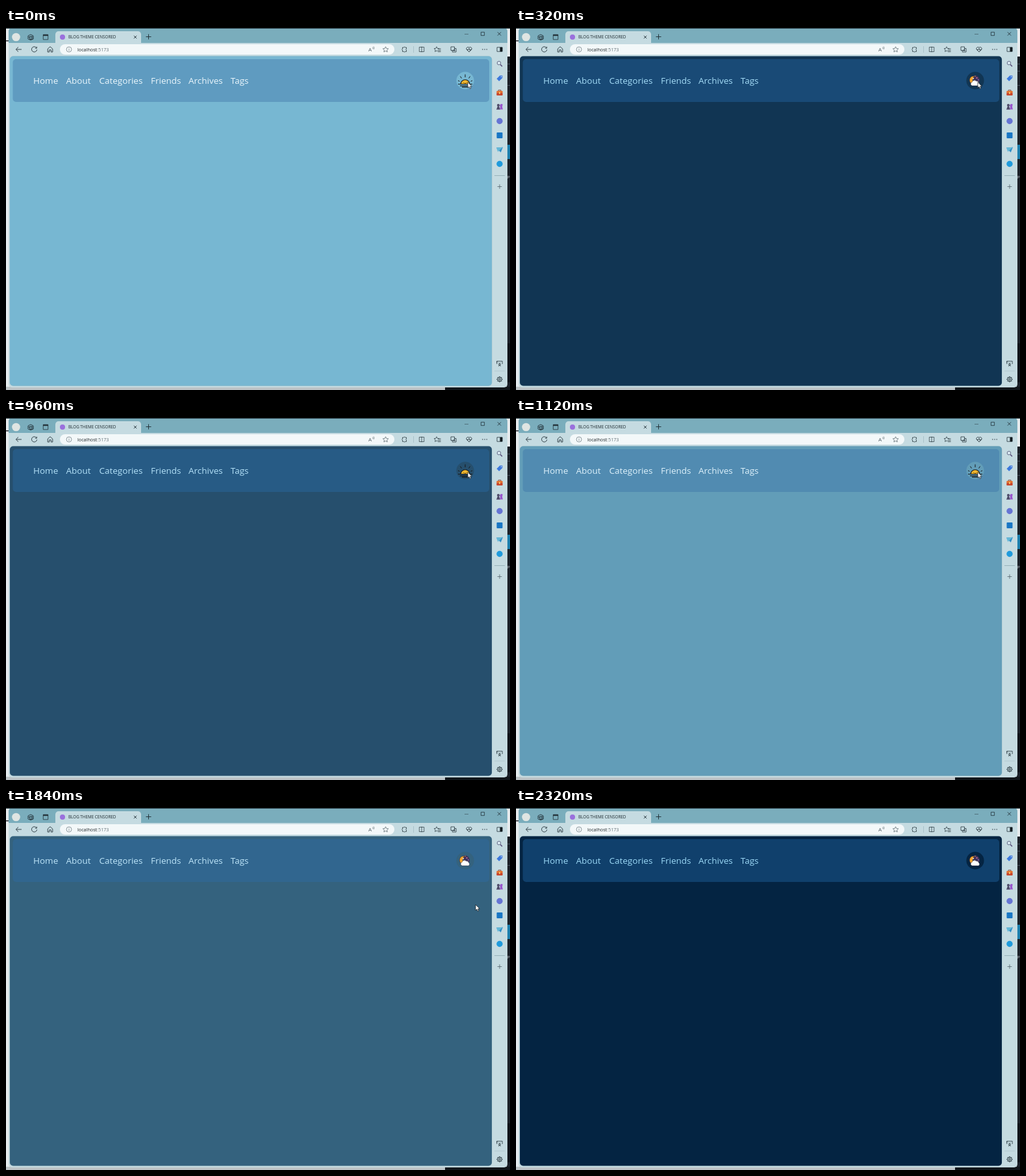
These frames come from a looping animation (776 by 558 pixels, 2640 ms). An HTML page with a canvas:

```html
<!DOCTYPE html>
<html lang="en">
<head>
<meta charset="utf-8">
<title>Blog theme switch</title>
<style>
html, body { margin: 0; width: 100%; height: 100%; overflow: hidden; background: #c5dbe1; }
canvas { display: block; width: 100%; height: 100%; }
</style>
</head>
<body>
<canvas id="stage"></canvas>
<script>
const W = 776, H = 558, LOOP = 2640, STEP = 80, FADE = 500;
const canvas = document.getElementById('stage');
const dpr = window.devicePixelRatio || 1;
canvas.width = W * dpr;
canvas.height = H * dpr;
const ctx = canvas.getContext('2d');
ctx.scale(dpr, dpr);

const FONT = '"Open Sans", "Noto Sans", sans-serif';
const INK = '#25343b', BAR = '#c5dbe1', TITLE = '#7aadbc';

// Day and night ends of each fading colour
const THEME = {
  page: [[119, 183, 210], [4, 36, 66]],
  nav: [[95, 155, 192], [16, 64, 108]],
  text: [[235, 247, 252], [155, 216, 246]]
};
const LINKS = [['Home', 42], ['About', 92.5], ['Categories', 143.5], ['Friends', 223], ['Archives', 281], ['Tags', 345.8]];
// Theme switches: start of the fade, and whether it goes to night
const SWITCHES = [[20, 1], [860, 0], [1672, 1]];

// cubic-bezier(.25, .1, .25, 1)
function ease(p) {
  if (p <= 0) return 0;
  if (p >= 1) return 1;
  const curve = (a, b, s) => 3 * a * s * (1 - s) ** 2 + 3 * b * s * s * (1 - s) + s ** 3;
  let lo = 0, hi = 1;
  for (let i = 0; i < 24; i++) {
    const mid = (lo + hi) / 2;
    if (curve(.25, .25, mid) < p) lo = mid; else hi = mid;
  }
  return curve(.1, 1, lo);
}

function mix([a, b], k) {
  return `rgb(${a.map((v, i) => Math.round(v + (b[i] - v) * k)).join(',')})`;
}

function rect(x, y, w, h, color, r = 0) {
  ctx.fillStyle = color;
  ctx.beginPath();
  ctx.roundRect(x, y, w, h, r);
  ctx.fill();
}

function disc(x, y, r, color) {
  ctx.fillStyle = color;
  ctx.beginPath();
  ctx.arc(x, y, r, 0, 7);
  ctx.fill();
}

function text(str, x, y, size, color) {
  ctx.font = `${size}px ${FONT}`;
  ctx.fillStyle = color;
  ctx.fillText(str, x, y);
}

// SVG path placed at x, y
function path(x, y, d, { fill, line = fill ? null : INK, width = .8 } = {}) {
  const p = new Path2D(d);
  ctx.save();
  ctx.translate(x, y);
  if (fill) { ctx.fillStyle = fill; ctx.fill(p); }
  if (line) { ctx.strokeStyle = line; ctx.lineWidth = width; ctx.stroke(p); }
  ctx.restore();
}

const ring = r => `M${r} 0A${r} ${r} 0 1 1 ${-r} 0A${r} ${r} 0 1 1 ${r} 0`;
const cross = r => `M${-r} ${-r}L${r} ${r}M${r} ${-r}L${-r} ${r}`;
const plus = r => `M${-r} 0H${r}M0 ${-r}V${r}`;
function star(r) {
  let d = '';
  for (let i = 0; i < 10; i++) {
    const a = i * Math.PI / 5, q = i % 2 ? r * .48 : r;
    d += `${i ? 'L' : 'M'}${q * Math.sin(a)} ${-q * Math.cos(a)}`;
  }
  return d + 'Z';
}

function desktop() {
  rect(0, 0, W, H, '#e6ebed');
  rect(0, 19, 4, 1.5, '#2b2f36');
  rect(771, 44, 5, 514, '#1c2129');
  rect(771, 180, 5, 22, '#1c7fae');
  for (const y of [55, 66, 88]) rect(772, y, 4, 1, '#46505b');
  rect(771, 486, 5, 60, '#10141a');
  text('P', 772, 232, 6, '#cfd6dc');
  rect(0, 553, 676, 5, '#bcc3c6');
  rect(676, 553, 100, 5, '#12171c');
}

function titleBar() {
  rect(4, 0, 768, 554, BAR, 5);
  rect(4, 0, 768, 23, TITLE, [5, 5, 0, 0]);
  rect(0, 0, W, 1, '#23343c');
  disc(15.5, 14, 6.3, '#dfe5e2');
  path(38, 14, 'M-4 -2L0 -4L4 -2V3L0 4.5L-4 3ZM-1.5 -1H3V3.5H-1.5ZM-4 0H-1.5M1 -1V3.5', { width: .9 });
  path(61, 14, 'M-3.7 -3.8H3.7V3.8H-3.7Z');
  rect(57, 10, 8, 2.2, INK);
  rect(76, 5, 132, 20, BAR, [5, 5, 0, 0]);
  disc(87, 14, 4, '#9a70dc');
  text('BLOG THEME CENSORED', 96, 16.2, 6.3, '#1d2a30');
  path(199, 14, cross(2.2), { width: .9 });
  path(219.5, 13.5, plus(4), { width: 1 });
  path(709, 9.5, 'M-3 0H3', { line: '#47636d' });
  path(734, 9, 'M-2.6 -2.6H2.6V2.6H-2.6Z');
  path(759.5, 9, cross(2.6), { width: .9 });
}

function toolBar() {
  path(19.5, 33, 'M4.5 0H-4M-.5 -3.6L-4.2 0L-.5 3.6', { width: .9 });
  path(43.5, 33, 'M3.5 -2.3A4.1 4.1 0 1 0 4.1 .4M3.8 -4.2V-1.8H1.4', { width: .9 });
  path(68, 33, 'M-3.8 -.8L0 -4.2L3.8 -.8V4H1.3V.8H-1.3V4H-3.8Z', { width: .9 });
  rect(83, 25, 515, 16, '#f3f8f9', 8);
  path(97, 33, ring(4), { line: '#66747a', width: .7 });
  path(97, 33, 'M0 -.4V2M0 -2.2V-1.3', { line: '#66747a' });
  text('localhost', 110, 35.6, 7.2, '#1d2529');
  const w = ctx.measureText('localhost').width;
  text(':5173', 110 + w, 35.6, 7.2, '#66747a');

  text('A', 558, 36.2, 8, '#4c5b62');
  path(565, 31, 'M-.5 -1.5Q.7 0 -.5 1.2M1 -2.5Q2.8 -.2 1 2', { line: '#4c5b62', width: .6 });
  path(584.5, 33.3, star(4.5), { line: '#4c5b62', width: .7 });
  path(613.5, 33, 'M-3 -3H-1A1.2 1.2 0 0 1 1.2 -3H3V-1A1.2 1.2 0 0 0 3 1.2V3.3H1.2A1.2 1.2 0 0 1 -1 3.3H-3V1.2A1.2 1.2 0 0 1 -3 -1Z');
  rect(627, 28, .7, 10, '#9fb8c0');
  path(640, 33, 'M-3.7 -3.5H3.7V3.5H-3.7ZM0 -4.3V4.3', { width: .7 });
  path(663, 33, star(4.2), { width: .7 });
  rect(664.5, 32, 5, 5.5, BAR);
  path(667, 33, 'M-2 -1H2.5M-2 1.3H2.5M-2 3.5H2.5', { width: .8 });
  path(689, 33, 'M-4 -4H1.5V1.5H-4ZM-1.8 1.5V4H4V-1.5H1.5M1 -.2V3M-.6 1.4H2.6');
  path(713, 33, 'M0 4L-3.7 .2C-5.2 -2 -2 -5.2 0 -2.5C2 -5.2 5.2 -2 3.7 .2ZM-3.5 .5H-1.3L0 -1.5L1.2 1.5L2 .3H3.8', { width: .9 });
  for (const x of [733.8, 737, 740.2]) disc(x, 33, .7, INK);
  path(760, 33, 'M-4 -3.2H4V3.2H-4Z');
  rect(760.5, 29.8, 3.8, 6.5, '#111a1e');
}

function sideBar() {
  const x = 760;
  path(x - 1, 54, ring(2.8), { fill: '#d8e8f0', line: '#68708c', width: 1 });
  path(x, 55, 'M1.2 1.4L4 4.2', { line: '#5a4f7c', width: 1.5 });
  path(x, 77.5, 'M-4.5 .8L.5 -4.2L4.3 -4.3V-.5L-.8 4.4Z', { fill: '#3c78dc' });
  disc(x + 2.6, 75, .8, '#e2efff');
  path(x, 99, 'M-2 -1.5V-3.2H2V-1.5', { line: '#8c4934', width: 1 });
  rect(x - 4.7, 97, 9.4, 3.5, '#e47432', 1);
  rect(x - 4.7, 100, 9.4, 4, '#c9472d', 1);
  rect(x - 1, 99, 2, 2.4, '#f7ce6a');
  disc(x - 2, 119, 2, '#4d4a68');
  path(x, 121.5, 'M-5 4.2L-3 -1H-1L1 4.2Z', { fill: '#4d4a68' });
  path(x, 121.5, 'M0 4L1 0L-.2 -2L2 -4.5L4.8 -4L4 0L5 4Z', { fill: '#9a58cc' });
  disc(x, 143.5, 4.7, '#6674d4');
  rect(x - 4.5, 161, 9, 9, '#1976c4', 1);
  path(x, 187.5, 'M-5 -3L5 -3.8L1.8 4.2L-1 1.4Z', { fill: '#2f8fc8' });
  path(x, 187.5, 'M-5 -3L5 -3.8L-1 1.4L-2.6 3.5Z', { fill: '#65b8d8' });
  disc(x, 209.5, 4.7, '#209bdc');
  rect(752, 227, 16, .8, '#8faab3');
  path(x, 244.5, plus(3.4), { line: '#53656d' });
  path(x, 517, 'M-4.2 1V-3.4H4.2V1M-4.2 -1.2V-3.4M-2 1.5L2 4.3M2 1.5L-2 4.3M-1.6 -1.2L1.6 2M1.6 -1.2L-1.6 2');
  rect(752, 528.5, 16, .7, '#a9c1c9');
  let gear = ring(1.4) + ring(3.4);
  for (let i = 0; i < 8; i++) {
    const c = Math.cos(i * Math.PI / 4), s = Math.sin(i * Math.PI / 4);
    gear += `M${3.3 * c} ${3.3 * s}L${4.6 * c} ${4.6 * s}`;
  }
  path(x, 541.5, gear, { width: 1 });
}

function sun() {
  const dark = '#17191c';
  path(707, 86.5, 'M-6.8 0A6.8 6.8 0 0 1 6.8 0Z', { fill: '#f7b92d', line: dark, width: 1.1 });
  path(707, 86.5, 'M-2.6 -2.8V-1.8M2.6 -2.8V-1.8M-1.2 -1.7Q0 -.5 1.2 -1.7', { line: dark, width: .7 });
  path(707, 86.5, 'M-11 0H11M-8 2.6H6M-5 4.6H5', { line: dark, width: 1.1 });
  path(707, 86.5, 'M0 -15V-10.5M-7.5 -12L-5.6 -9M7.5 -12L5.6 -9M-11 -5.5L-8.6 -4.2M11 -5.5L8.6 -4.2', { line: dark, width: 1 });
}

function moon() {
  const dark = '#2c2438';
  path(706.5, 81, 'M-1 -8A7.5 7.5 0 0 1 7 2L2 4L-3 -3Z', { fill: '#40345c' });
  path(706.5, 81, 'M-.5 -6.5C-5 -8 -9 -4 -8 1C-7 5 -3 6 0 4C-4 2 -4.5 -3 -.5 -6.5Z', { fill: '#f5a62c', line: dark, width: .6 });
  path(706.5, 81, 'M-4 8A2.8 2.8 0 0 1 -4.3 2.5A3.6 3.6 0 0 1 2 .8A3.2 3.2 0 0 1 6 3.6A2.4 2.4 0 0 1 5.5 8Z', { fill: '#ffffff', line: dark, width: .5 });
  disc(704, 78, 1.1, '#f4e6d5');
  disc(709.5, 77, 1, '#e27795');
  disc(711.8, 80, .8, '#b991db');
  disc(707, 74.2, .7, '#e7a15a');
}

function cursor(t) {
  const u = Math.max(0, (t - 1680) / 160);
  const x = 711 + 12 * u, y = 83.5 + 65.5 * u * u;
  if (y < H) path(x, y, 'M0 0V8.8L2 7L3.4 10.1L4.9 9.4L3.6 6.4H6.3Z', { fill: '#ffffff', line: '#15191c', width: .7 });
}

function themeAt(t) {
  let night = 0, icon = sun;
  for (const [start, toNight] of SWITCHES) {
    if (t < start) break;
    const k = ease((t - start) / FADE);
    night = toNight ? k : 1 - k;
    icon = toNight ? moon : sun;
  }
  return { night, icon };
}

function draw(t) {
  const { night, icon } = themeAt(t);
  const page = mix(THEME.page, night);
  desktop();
  titleBar();
  toolBar();
  sideBar();
  rect(5.5, 43, 743, 509, '#a6c3cc', 6);
  rect(6, 43.5, 742, 508, page, 5);
  rect(10.5, 48, 733.5, 66, mix(THEME.nav, night), 5);
  for (const [label, x] of LINKS) text(label, x, 86.4, 13.5, mix(THEME.text, night));
  disc(707, 81, 13.6, page);
  icon();
  cursor(t);
}

const begin = performance.now();
function frame() {
  const t = (performance.now() - begin) % LOOP;
  draw(Math.floor(t / STEP) * STEP);
  requestAnimationFrame(frame);
}
frame();
</script>
</body>
</html>
```
